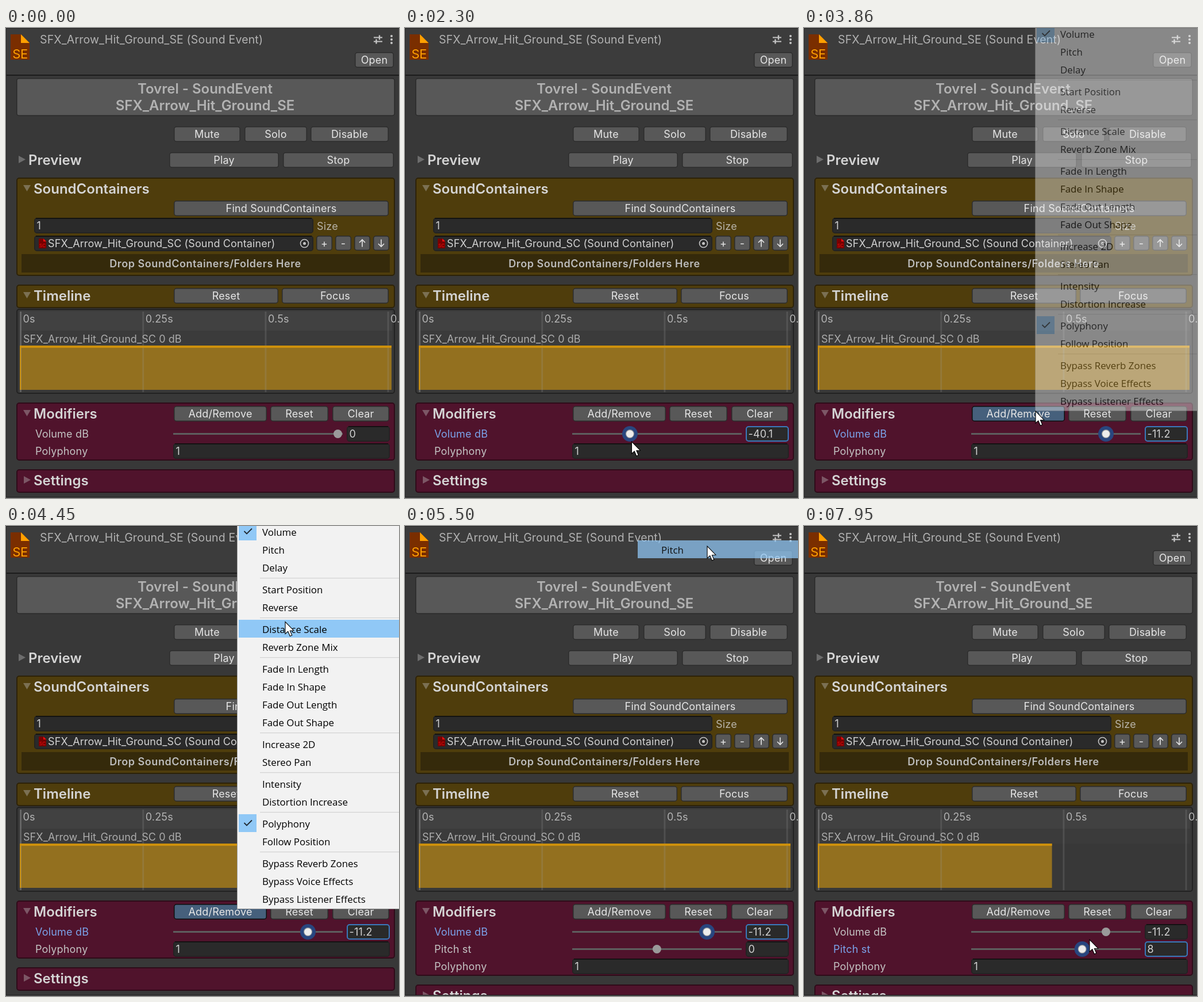
An HTML page with a canvas for the animation above (8000 ms loop, 684x817 px).

```html
<!DOCTYPE html>
<html lang="en">
<head>
<meta charset="utf-8">
<title>Sound event inspector</title>
<style>
html, body { margin: 0; width: 100%; height: 100%; overflow: hidden; background: #383838; }
canvas { display: block; }
</style>
</head>
<body>
<canvas id="stage" width="684" height="817"></canvas>
<script>
const stage = document.getElementById('stage');
const overlay = stage.cloneNode().getContext('2d');
let c = stage.getContext('2d');
const LOOP = 8000;
const UI = 'Inter, "Liberation Sans", sans-serif';
const MENU_FONT = '16.9px "Open Sans", "Noto Sans", sans-serif';
const LABEL = '#c4c4c4', FOCUS = '#7ba3ea', HILITE = '#90c8f6';

// Menu groups, separated by lines
const groups = [
  ['Volume', 'Pitch', 'Delay'],
  ['Start Position', 'Reverse'],
  ['Distance Scale', 'Reverb Zone Mix'],
  ['Fade In Length', 'Fade In Shape', 'Fade Out Length', 'Fade Out Shape'],
  ['Increase 2D', 'Stereo Pan'],
  ['Intensity', 'Distortion Increase'],
  ['Polyphony', 'Follow Position'],
  ['Bypass Reverb Zones', 'Bypass Voice Effects', 'Bypass Listener Effects']
];
const items = [], seps = [];
let menuY = -6;
groups.forEach((g, i) => {
  if (i) { seps.push(menuY + 3); menuY += 7; }
  g.forEach(name => { items.push({ name, y: menuY }); menuY += 31; });
});

const smooth = p => p * p * (3 - 2 * p);
const easeOut = p => 1 - (1 - p) * (1 - p);
const linear = p => p;
const clamp = v => Math.max(0, Math.min(1, v));

// Keys are [time, values, ease into this key]
function track(keys, t) {
  let a = keys[0];
  if (t <= a[0]) return a[1];
  for (const b of keys) {
    if (t < b[0]) {
      const p = (b[2] || smooth)((t - a[0]) / (b[0] - a[0]));
      return a[1].map((v, i) => v + (b[1][i] - v) * p);
    }
    a = b;
  }
  return a[1];
}

const pointer = [
  [680, [600, 778]], [1100, [580.5, 709]], [1410, [580.5, 709]],
  [2150, [394.5, 719]], [2300, [394.5, 719]],
  [3050, [528.5, 706]], [3170, [528.5, 706]],
  [3760, [403, 666]], [4030, [403, 666]],
  [4830, [510, 22], easeOut], [4950, [510, 22]],
  [5190, [526, 35]], [5500, [526, 35]],
  [6270, [437, 741]], [6450, [437, 741]],
  [6630, [443, 733]], [6880, [443, 733]],
  [7650, [474, 726]], [7950, [497, 719], linear]
];
const volumeKeys = [[1410, [0]], [2150, [-40.1]], [2300, [-40.1]], [3050, [-11.2]]];
const pitchKeys = [[6880, [0]], [7650, [4.8]], [7950, [8], linear]];

function rect(x, y, x2, y2, fill) {
  c.fillStyle = fill;
  c.fillRect(x, y, x2 - x, y2 - y);
}

function box(x, y, x2, y2, fill, border, r = 4, w = 1.5) {
  c.beginPath();
  c.roundRect(x + w / 2, y + w / 2, x2 - x - w, y2 - y - w, r);
  c.fillStyle = fill;
  c.fill();
  c.strokeStyle = border;
  c.lineWidth = w;
  c.stroke();
}

const panel = (y, y2, fill, border) => box(18, y, 677, y2, fill, border, 4, 2);

function poly(pts, fill) {
  c.beginPath();
  pts.forEach(([x, y]) => c.lineTo(x, y));
  c.closePath();
  c.fillStyle = fill;
  c.fill();
}

function line(pts, color, w) {
  c.beginPath();
  pts.forEach(([x, y]) => c.lineTo(x, y));
  c.strokeStyle = color;
  c.lineWidth = w;
  c.stroke();
}

function dot(x, y, r, fill) {
  c.beginPath();
  c.arc(x, y, r, 0, 7);
  c.fillStyle = fill;
  c.fill();
}

// y is the middle of the capitals
function text(s, x, y, color = LABEL, { size = 18, weight = 400, align = 'left', space = 0.2 } = {}) {
  c.font = `${weight} ${size}px ${UI}`;
  c.letterSpacing = space + 'px';
  c.textAlign = align;
  c.fillStyle = color;
  c.fillText(s, x, y + size * 0.364);
}

const heading = (s, x, y) => text(s, x, y, '#d4d4d4', { size: 24, weight: 600, space: 0 });

function fold(x, y, open) {
  poly(open ? [[x, y], [x + 13, y], [x + 6.5, y + 11]] : [[x, y], [x + 12, y + 6.5], [x, y + 13]],
    'rgba(190,190,190,.4)');
}

function button(s, x, y, x2, y2, st, pressed) {
  const over = st.hover && st.x > x && st.x < x2 && st.y > y && st.y < y2;
  box(x, y, x2, y2, pressed ? '#46607c' : over ? '#676767' : '#585858', pressed ? '#0d0d0d' : '#2b2b2b');
  text(s, (x + x2) / 2, (y + y2) / 2, '#e6e6e6', { align: 'center' });
}

function field(s, x, y, x2, y2, focused) {
  box(x, y, x2, y2, '#2a2a2a', focused ? '#3a79bb' : '#212121', 4, focused ? 2 : 1.5);
  if (!focused) rect(x + 3, y, x2 - 3, y + 1.5, '#0d0d0d');
  text(s, x + 4.5, (y + y2) / 2, '#d2d2d2');
}

function page(x, y, w, h, f, fill, corner) {
  poly([[x, y], [x + w - f, y], [x + w, y + f], [x + w, y + h], [x, y + h]], fill);
  poly([[x + w - f, y], [x + w, y + f], [x + w - f, y + f]], corner);
}

function slider(label, y, thumb, value, focused, lit) {
  text(label, 51, y, focused ? FOCUS : LABEL);
  rect(291, y - 1.5, 586, y + 1.5, '#5e5e5e');
  if (focused) dot(thumb, y, 13.5, '#28467f');
  dot(thumb, y, 7.5, '#9a9a9a');
  if (focused || lit) dot(thumb, y, 6.3, '#ececec');
  field(value, 593, y - 13.5, 668, y + 13.5, focused);
}

function header(st) {
  rect(0, 0, 684, 81, '#3c3c3c');
  rect(0, 81, 684, 83, '#1c1c1c');
  page(8, 11, 33, 44, 15, '#7a2e00', '#ffa000');
  text('SE', 24.5, 45, '#ffa000', { size: 22, align: 'center', space: -0.3 });
  text('SFX_Arrow_Hit_Ground_SE (Sound Event)', 59, 20, '#b2b2b2', { size: 19.5, space: 0.16 });
  line([[640, 16.5], [655, 16.5]], LABEL, 2);
  line([[640, 23.5], [655, 23.5]], LABEL, 2);
  line([[650, 12.5], [650, 20.5]], LABEL, 2.4);
  line([[644.5, 19.5], [644.5, 27.5]], LABEL, 2.4);
  [14, 20, 26].forEach(y => dot(671, y, 2, LABEL));
  button('Open', 607, 42, 675, 69, st);

  box(18, 87, 677, 153, '#585858', '#292929');
  const big = { size: 24, weight: 600, align: 'center', space: 0 };
  text('Tovrel - SoundEvent', 346.5, 105.5, '#b2b2b2', big);
  text('SFX_Arrow_Hit_Ground_SE', 346.5, 134.5, '#b2b2b2', big);

  button('Mute', 292, 171, 408, 198, st);
  button('Solo', 415, 171, 524, 198, st);
  button('Disable', 530, 171, 666, 198, st);
  fold(22, 222, false);
  heading('Preview', 39, 229);
  button('Play', 284, 216, 475, 243, st);
  button('Stop', 482, 216, 675, 243, st);
}

function containers(st) {
  panel(260, 431, '#4f3d0c', '#2d2208');
  fold(30, 273, true);
  heading('SoundContainers', 48, 279);
  button('Find SoundContainers', 292, 300, 666, 327, st);
  field('1', 49, 330, 535, 357);
  text('Size', 541, 344, '#b8b4aa');
  field('', 49, 361, 535, 388);
  page(57, 366, 13, 17, 5, '#780000', '#f01010');
  text('SC', 63.5, 378.5, '#f01010', { size: 8, align: 'center', space: 0 });
  text('SFX_Arrow_Hit_Ground_SC (Sound Container)', 73, 374.5, '#d2d2d2', { space: 0.12 });
  c.beginPath();
  c.arc(519.5, 374.5, 7, 0, 7);
  c.strokeStyle = LABEL;
  c.lineWidth = 1.6;
  c.stroke();
  dot(519.5, 374.5, 2.5, LABEL);
  ['+', '-', '', ''].forEach((s, i) => {
    const x = 540 + 33 * i;
    button(s, x, 361, x + 28, 387, st);
  });
  [[620, 1], [653, -1]].forEach(([x, d]) => {
    const tip = 374 - 6 * d;
    line([[x, 374 + 6.5 * d], [x, tip]], '#e6e6e6', 1.6);
    line([[x - 5, tip + 5 * d], [x, tip], [x + 5, tip + 5 * d]], '#e6e6e6', 1.6);
  });
  rect(27, 393, 668, 425, '#352a0b');
  text('Drop SoundContainers/Folders Here', 347, 409.5, '#bcbcbc',
    { weight: 600, align: 'center', space: 0.55 });
}

function timeline(st) {
  panel(446, 487, '#4f3d0c', '#2d2208');
  fold(30, 459, true);
  heading('Timeline', 48, 465);
  button('Reset', 292, 452, 474, 479, st);
  button('Focus', 480, 452, 666, 479, st);

  panel(488, 636, '#383838', '#222222');
  rect(24, 492, 672, 526, '#414141');
  rect(24, 526, 672, 552, '#3b3b3b');
  const end = 24 + 647 * Math.pow(2, -st.pitch / 12);
  rect(24, 552, end, 629, '#93701f');
  for (let i = 0; i < 4; i++) {
    const x = 24 + 213.2 * i;
    rect(x, 493, x + 3, 633, i ? 'rgba(150,150,150,.22)' : 'rgba(160,160,160,.38)');
    text(['0s', '0.25s', '0.5s', '0.75s'][i], x + 5.5, 505, '#b4b4b4');
  }
  rect(24, 552, end, 556, '#cd900c');
  rect(24, 552, 26, 629, '#cd900c');
  text('SFX_Arrow_Hit_Ground_SC 0 dB', 30, 540, '#acacac', { space: 0.06 });
}

function modifiers(st) {
  const drop = st.hasPitch ? 30 : 0;
  panel(651, 752 + drop, '#50132c', '#2f0b19');
  fold(30, 664, true);
  heading('Modifiers', 48, 670);
  button('Add/Remove', 292, 657, 454, 684, st, st.pressed);
  button('Reset', 460, 657, 561, 684, st);
  button('Clear', 568, 657, 667, 684, st);

  const near = (x, y) => st.hover && Math.hypot(st.x - x, st.y - y) < 9;
  const vx = 577.5 + 4.64 * st.volume, px = 438.4 + 5.72 * st.pitch;
  slider('Volume dB', 705.5, vx, show(st.volume), st.focus === 'volume', near(vx, 705.5));
  if (st.hasPitch)
    slider('Pitch st', 735.5, px, show(st.pitch), st.focus === 'pitch', near(px, 735.5));
  text('Polyphony', 51, 735.5 + drop);
  field('1', 291, 722 + drop, 668, 749 + drop);

  panel(767 + drop, 808 + drop, '#50132c', '#2f0b19');
  fold(31, 779 + drop, false);
  heading('Settings', 48, 786 + drop);
}

const show = v => String(Math.round(v * 10) / 10 || 0);

// Paints a group and blends it in as one layer
function fade(alpha, paint) {
  if (alpha <= 0) return;
  const main = c;
  c = overlay;
  c.clearRect(0, 0, 684, 817);
  paint();
  c = main;
  c.globalAlpha = alpha;
  c.drawImage(overlay.canvas, 0, 0);
  c.globalAlpha = 1;
}

function menuItem(item, lit) {
  if (lit) rect(405, item.y, 684, item.y + 31, HILITE);
  c.font = MENU_FONT;
  c.letterSpacing = '0px';
  c.textAlign = 'left';
  c.fillStyle = '#000';
  c.fillText(item.name, 446, item.y + 22.6);
}

function menu(st) {
  rect(402, 0, 684, 666, '#a2a2a2');
  rect(403, 0, 684, 665, '#f2f2f2');
  seps.forEach(y => rect(442, y, 684, y + 1.2, '#d2d2d2'));
  items.forEach(item => {
    menuItem(item, st.x > 404 && st.y >= item.y && st.y < item.y + 31);
    if (item.name === 'Volume' || item.name === 'Polyphony') {
      rect(405, item.y, 436, item.y + 31, HILITE);
      const y = item.y + 15;
      line([[414.5, y], [419, y + 4.5], [428, y - 4.5]], '#202830', 1.8);
    }
  });
}

function cursor(x, y) {
  c.save();
  c.translate(x, y);
  poly([[0, 0], [0, 21], [4.8, 16.7], [8.3, 25], [11.8, 23.5], [8.4, 15.4], [14.8, 15.2]], '#fff');
  c.strokeStyle = '#000';
  c.lineWidth = 1.1;
  c.stroke();
  c.restore();
}

function draw(t) {
  const [x, y] = track(pointer, t);
  const menuAlpha = t < 5500 ? clamp((t - 3800) / 145) : 0;
  const flash = t >= 5500 ? 0.73 * clamp(1 - (t - 5500) / 240) : 0;
  const st = {
    x, y,
    hover: t >= 680 && menuAlpha === 0,
    volume: track(volumeKeys, t)[0],
    pitch: track(pitchKeys, t)[0],
    hasPitch: t >= 5500,
    pressed: t >= 3780 && t < 5500,
    focus: t < 1410 ? '' : t < 6910 ? 'volume' : 'pitch'
  };

  rect(0, 0, 684, 817, '#383838');
  header(st);
  containers(st);
  timeline(st);
  modifiers(st);
  rect(0, 0, 684, 1, '#242424');
  rect(0, 0, 1, 817, '#242424');
  rect(0, 815, 684, 816, '#222222');
  rect(0, 816, 684, 817, '#505050');

  fade(menuAlpha, () => menu(st));
  fade(flash, () => menuItem(items[1], true));
  if (t >= 680) cursor(x, y);
}

const start = performance.now();
function frame() {
  draw((performance.now() - start) % LOOP);
  requestAnimationFrame(frame);
}
frame();
</script>
</body>
</html>
```
